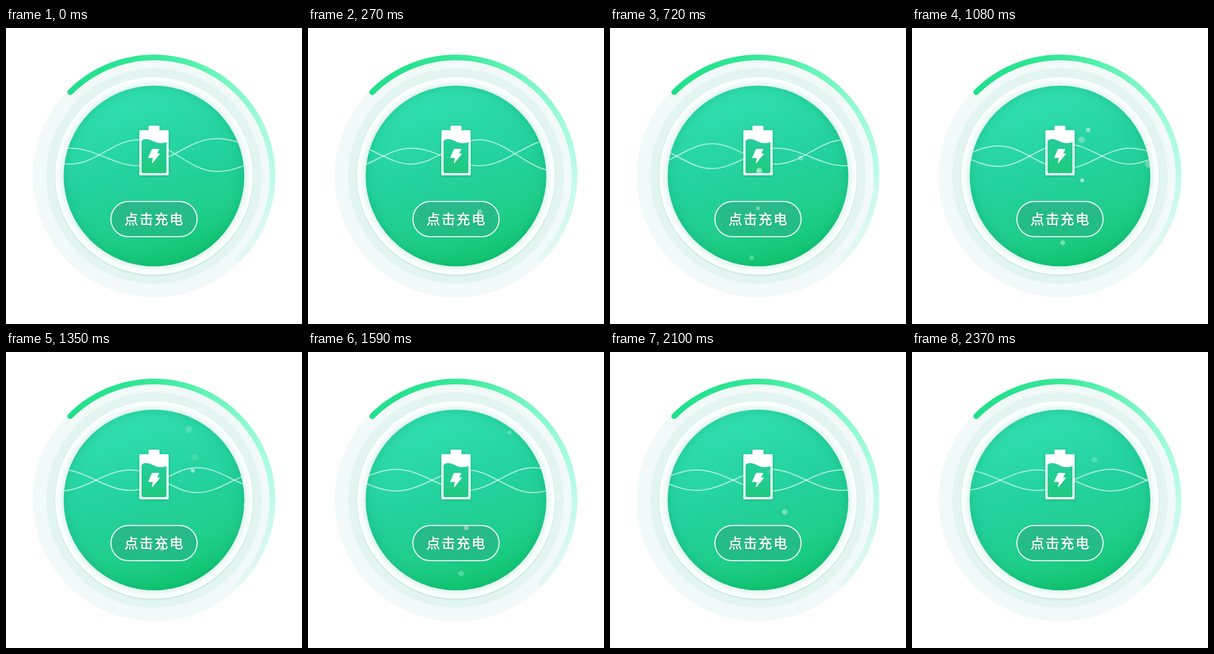
An HTML page with a canvas that plays this animation: 522 px wide and 522 px high, repeating every 2.4 s.

```html
<!DOCTYPE html>
<html lang="zh">
<head>
<meta charset="utf-8">
<style>
html, body { margin: 0; width: 100%; height: 100%; overflow: hidden; background: #fff; }
canvas { display: block; width: 522px; height: 522px; }
</style>
</head>
<body>
<canvas id="stage" width="522" height="522"></canvas>
<script>
const ctx = document.getElementById('stage').getContext('2d');
const LOOP = 2400, STEP = 30, C = 261, TAU = Math.PI * 2;
const FACE = 159.3;
const WAVE_SPEED = 0.25; // px per ms

// Crest and trough height of each swell, from left to right
const swells = [
  [208, 244], [208, 244], [207, 245], [208, 244], [204, 248],
  [212, 240], [197, 243], [195, 253], [195, 253]
];

const bubbles = [
  { life: [40, 930], from: [282, 342], to: [346, 164], r: 4.5 },
  { life: [450, 1450], from: [238, 269], to: [332, 111], r: 5.8 },
  { life: [450, 1450], from: [234, 274], to: [362, 67], r: 4 },
  { life: [570, 1680], from: [249, 325], to: [366, 114], r: 3.4 },
  { life: [570, 2130], from: [243, 409], to: [281, 205], r: 4.3 },
  { life: [570, 1400], from: [463, 292], to: [314, 174], r: 6 },
  { life: [1330, 2310], from: [420, 270], to: [473, 120], r: 4.3 },
  { life: [1430, 2480], from: [258, 401], to: [327, 146], r: 5 }
];

const mix = (a, b, k) => a + (b - a) * k;

function gradient(g, ...colors) {
  colors.forEach((color, i) => g.addColorStop(i / (colors.length - 1), color));
  return g;
}

function disc(x, y, r, fill) {
  ctx.beginPath();
  ctx.arc(x, y, r, 0, TAU);
  ctx.fillStyle = fill;
  ctx.fill();
}

function shadow(color, blur, dy) {
  ctx.shadowColor = color;
  ctx.shadowBlur = blur;
  ctx.shadowOffsetY = dy;
}

function drawArc() {
  const start = Math.PI * 1.25;
  const sweep = ctx.createConicGradient(start, C, C);
  ['#1fe08a', '#27e38f', '#36e999', '#5cf2b0', '#86f8ca', '#a6fbdd', '#c0faea', '#d8f8f0', '#e6f8f3']
    .forEach((color, i) => sweep.addColorStop(i / 16, color));
  sweep.addColorStop(.6, '#e6f8f3');
  sweep.addColorStop(.6, '#1fe08a'); // keeps the round start cap green
  ctx.beginPath();
  ctx.arc(C, C, 209, start, start + Math.PI);
  ctx.lineWidth = 10;
  ctx.lineCap = 'round';
  ctx.strokeStyle = sweep;
  ctx.stroke();
}

function drawRings() {
  disc(C, C, 214, '#f1faf8');
  disc(C, C, 190, '#e3f5f1');
  drawArc();
  ctx.save();
  shadow('rgba(110,200,175,.4)', 3, 1.5);
  disc(C, C, 174, '#fff');
  ctx.restore();
  disc(C, C, 174, gradient(ctx.createRadialGradient(C, C, 157, C, C, 174),
    '#d2f0e7', '#e9f8f4', '#f8fdfc', '#fff'));
}

function drawFace() {
  disc(C, C, FACE, gradient(ctx.createLinearGradient(215, 103, 310, 420),
    '#33e0b0', '#2ad8a6', '#23d19b', '#1fce8b', '#10c56d'));
  disc(C, C, FACE, gradient(ctx.createRadialGradient(C, C, 125, C, C, FACE),
    'rgba(0,155,98,0)', 'rgba(0,155,98,.02)', 'rgba(0,155,98,.06)', 'rgba(0,155,98,.2)'));
}

// Swells grow wider away from the middle one
function swellX(i) {
  const m = i - 4.5;
  return 57 + 114 * m + (1.4 + .2 * m) * m ** 3;
}

function drawWave(parity) {
  ctx.beginPath();
  swells.forEach((heights, i) => {
    const x = swellX(i), y = heights[(i + parity) % 2];
    if (i === 0) return ctx.moveTo(x, y);
    const prevX = swellX(i - 1), prevY = swells[i - 1][(i - 1 + parity) % 2];
    const handle = (x - prevX) * .365;
    ctx.bezierCurveTo(prevX + handle, prevY, x - handle, y, x, y);
  });
  ctx.stroke();
}

function drawWaves(t) {
  ctx.save();
  ctx.beginPath();
  ctx.arc(C, C, FACE, 0, TAU);
  ctx.clip();
  ctx.translate(t * WAVE_SPEED, 0);
  ctx.lineWidth = 2;
  ctx.strokeStyle = 'rgba(255,255,255,.58)';
  drawWave(0);
  drawWave(1);
  ctx.restore();
}

function drawBattery() {
  ctx.save();
  shadow('rgba(0,110,70,.35)', 5, 1);
  ctx.beginPath();
  ctx.roundRect(251, 172, 20, 14, 2);
  ctx.roundRect(235, 180, 52, 80, 2);
  ctx.fillStyle = '#d3f3e7';
  ctx.fill();
  ctx.restore();
  ctx.beginPath();
  ctx.roundRect(252, 173, 18, 12, 1.5);
  ctx.roundRect(236.2, 181.2, 49.6, 77.6, 1.5);
  ctx.fillStyle = '#fff';
  ctx.fill();

  ctx.fillStyle = gradient(ctx.createLinearGradient(0, 196, 0, 256), '#25ce9d', '#1fca7e');
  ctx.fill(new Path2D('M239 201C239 197.500 242 196 247 196C257 196 262 203 272 203' +
    'Q279 203 283 201V253Q283 256 280 256H242Q239 256 239 253Z'));

  const bolt = new Path2D('M258 214H269.500L265.500 222H270.500L258 237.500L260 228.500H251.500Z');
  ctx.fillStyle = ctx.strokeStyle = '#fff';
  ctx.lineWidth = 1.5;
  ctx.lineJoin = 'round';
  ctx.fill(bolt);
  ctx.stroke(bolt);
}

function drawButton() {
  ctx.beginPath();
  ctx.roundRect(185, 306, 152, 62, 31);
  ctx.fillStyle = gradient(ctx.createLinearGradient(0, 306, 0, 368), '#2ab98b', '#20bf83');
  ctx.fill();
  ctx.lineWidth = 2;
  ctx.strokeStyle = 'rgba(255,255,255,.9)';
  ctx.stroke();

  ctx.save();
  ctx.font = '500 24px "Noto Sans CJK SC", "Noto Sans CJK", sans-serif';
  ctx.fillStyle = ctx.strokeStyle = '#fff';
  ctx.lineWidth = .7;
  [...'点击充电'].forEach((char, i) => {
    const x = 209 + i * 26.4;
    shadow('rgba(0,100,60,.4)', 3, 1);
    ctx.fillText(char, x, 346);
    shadow('transparent', 0, 0);
    ctx.strokeText(char, x, 346);
  });
  ctx.restore();
}

// Bubbles speed up as they rise, sway to the right and fade in and out
function drawBubble({ life, from, to, r }, t) {
  const age = (t - life[0]) / (life[1] - life[0]);
  if (age <= 0 || age >= 1) return;
  const rise = age ** 1.7, swell = Math.sin(Math.PI * age);
  const alpha = 1.9 / r * Math.sqrt(swell);
  disc(mix(from[0], to[0], rise) + 20 * swell, mix(from[1], to[1], rise), r, `rgba(255,255,255,${alpha})`);
}

function render() {
  const t = Math.floor(performance.now() % LOOP / STEP) * STEP;
  ctx.fillStyle = '#fff';
  ctx.fillRect(0, 0, 522, 522);
  drawRings();
  drawFace();
  drawWaves(t);
  drawBattery();
  drawButton();
  bubbles.forEach(bubble => drawBubble(bubble, t));
  requestAnimationFrame(render);
}
render();
</script>
</body>
</html>
```
